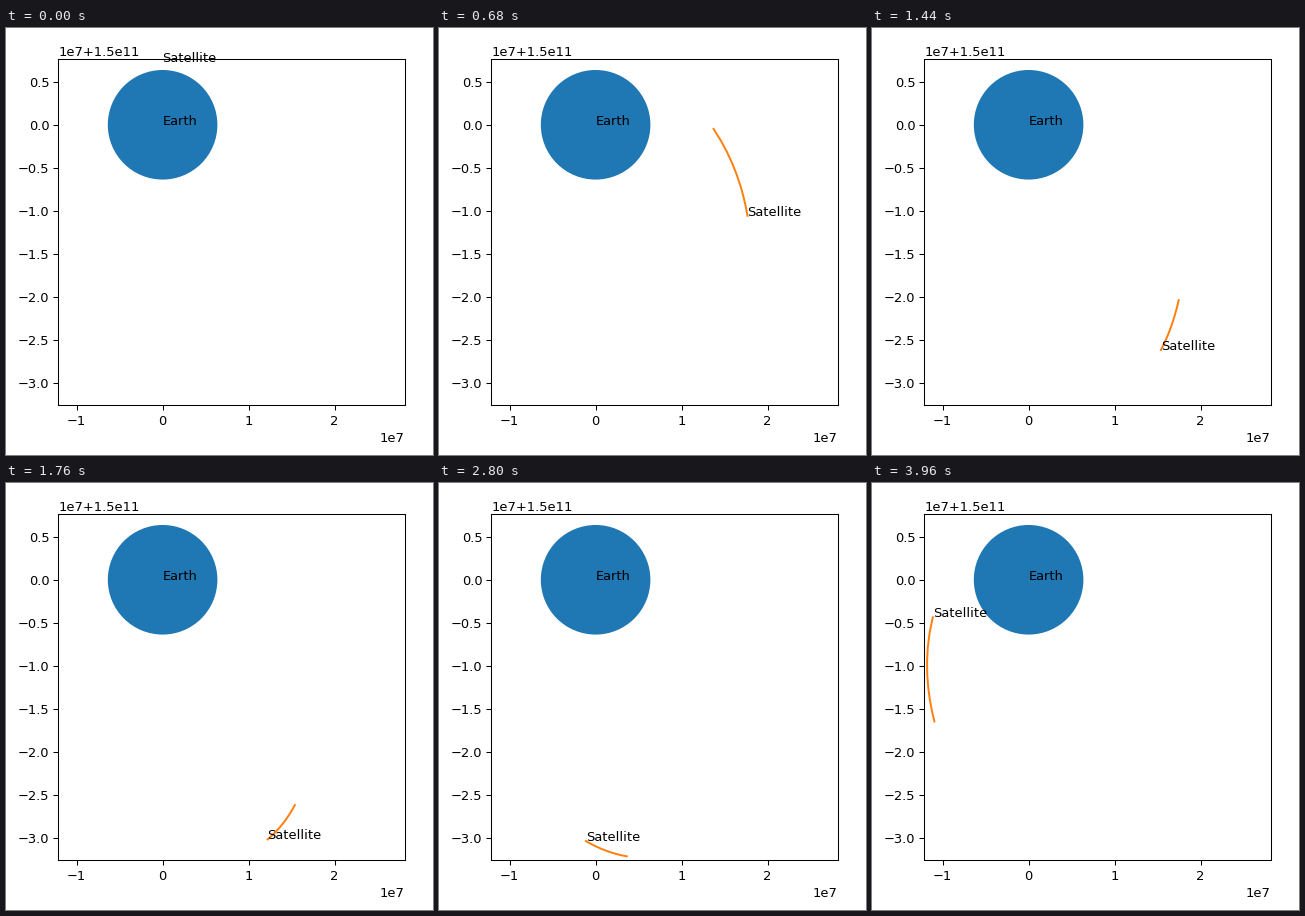
A matplotlib script that plays this animation: 427 by 427 pixels, repeating every 4000 ms.

```python
import numpy as np
import matplotlib.pyplot as plt
from matplotlib.animation import FuncAnimation
from matplotlib.patches import Circle
from matplotlib.ticker import MultipleLocator

SIZE, DPI = 427, 93.6
FRAMES, INTERVAL = 100, 40
UNIT = 1e7            # metres per axis unit
EARTH_Y = 1.5e11
EARTH_R = 6.371e6
TRAIL = 8             # steps kept behind the satellite
HOLD = 16             # the satellite pauses once every HOLD frames
SUBSTEPS = 100

# semi-latus rectum, eccentricity vector, swept area per step
OUTBOUND = np.array([1.201, 0.1026, -0.6394, 0.0907])
INBOUND = np.array([1.107, 0.1713, -0.6427, 0.0926])


def elements(phi):
    """Orbit drifts from the outbound to the inbound ellipse near apogee."""
    t = np.clip((-50 - np.degrees(phi)) / 35, 0, 1)
    w = t * t * (3 - 2 * t)
    return OUTBOUND + (INBOUND - OUTBOUND) * w


def radius(phi):
    p, ex, ey, _ = elements(phi)
    return p / (1 - ex * np.cos(phi) - ey * np.sin(phi))


def rate(phi):
    return -2 * elements(phi)[3] / radius(phi) ** 2


def orbit(steps):
    phi, dt, path = np.pi / 2, 1 / SUBSTEPS, []
    for _ in range(steps):
        r = radius(phi)
        path.append((r * np.cos(phi), r * np.sin(phi)))
        for _ in range(SUBSTEPS):
            phi += dt * rate(phi + dt / 2 * rate(phi))
    return np.array(path) * UNIT + (0, EARTH_Y)


path = orbit(FRAMES - FRAMES // HOLD)

side = (SIZE + 0.001) / DPI
fig = plt.figure(figsize=(side, side), dpi=DPI, facecolor="white")
left, right, top, bottom = 52.4, 398.9, 31.5, 377.5
ax = fig.add_axes([left / SIZE, 1 - bottom / SIZE,
                   (right - left) / SIZE, (bottom - top) / SIZE])
ax.set_xlim(-1.2116 * UNIT, 2.8174 * UNIT)
ax.set_ylim(EARTH_Y - 3.264 * UNIT, EARTH_Y + 0.759 * UNIT)
ax.xaxis.set_major_locator(MultipleLocator(UNIT))
ax.yaxis.set_major_locator(MultipleLocator(UNIT / 2))

ax.add_patch(Circle((0, EARTH_Y), EARTH_R, color="C0", lw=0))
ax.text(0, EARTH_Y, "Earth")
trail, = ax.plot([], [], color="C1")
label = ax.text(*path[0], "Satellite")


def update(frame):
    i = frame - frame // HOLD
    pts = path[max(0, i - TRAIL):i + 1]
    trail.set_data(pts[:, 0], pts[:, 1])
    trail.set_visible(i > 0)
    label.set_position(path[i])
    return trail, label


anim = FuncAnimation(fig, update, frames=FRAMES, interval=INTERVAL,
                     repeat=True, repeat_delay=0, blit=False)
plt.show()
```
